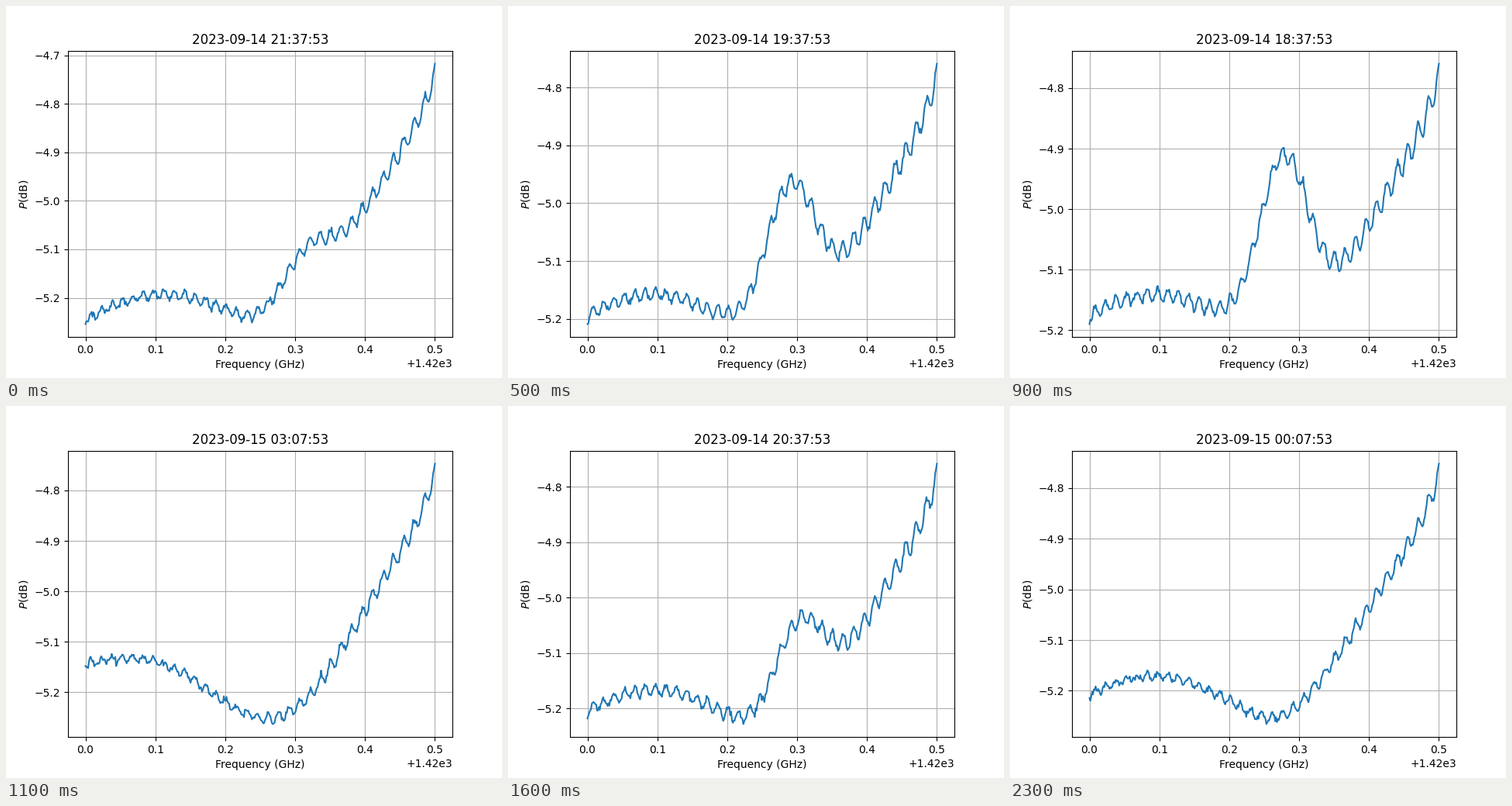
Recreate the animation shown at these times as a matplotlib script. Size 640 by 480 pixels, loop 2400 ms.

```python
import numpy as np
import matplotlib.pyplot as plt
from matplotlib.animation import FuncAnimation

STEP_MS = 100
X = np.linspace(0, 0.5, 400)

# Quiet receiver response in dB, one point per 0.05
BAND = [-5.128, -5.116, -5.124, -5.159, -5.211, -5.246,
        -5.225, -5.148, -5.024, -4.909, -4.747]
RESPONSE = np.polyval(np.polyfit(np.linspace(0, 1, len(BAND)), BAND, 7), 2 * X)

# Extremes of the sweeps through the night; slots count half hours from 20:37
SLOTS = [-5, 0, 1, 2, 6, 7, 11, 13]
LOWS = [-5.180, -5.2282, -5.2365, -5.2541, -5.2563, -5.2657, -5.2583, -5.2630]
HIGHS = [-4.760, -4.7583, -4.7632, -4.7174, -4.7510, -4.7517, -4.7549, -4.7469]

# Sweeps play unsorted; the first one holds for two steps
ORDER = [2, 2, 9, 1, 14, -2, 4, 11, 16, -4, 5, 13,
         -1, 8, 17, -5, 0, 10, 3, 6, 12, -3, 15, 7]


def fade(slot, middle, width):
    return 1 / (1 + np.exp((slot - middle) / width))


def spectrum(slot):
    lo = np.interp(slot, SLOTS, LOWS)
    hi = np.interp(slot, SLOTS, HIGHS)
    early = fade(slot, 0, 2.2)

    # The emission line drifts up in frequency and dies away
    centre = 0.302 + 0.006 * slot
    bump = 0.4 * early * np.exp(-((X - centre) / 0.036) ** 2 / 2)
    sag = 0.08 * fade(slot, 9, 1) * np.clip(1 - X / 0.2, 0, 1)
    tilt = (hi + 4.754) * (X / 0.25 - 1)

    # Standing wave, stronger towards the upper edge
    size = 0.0065 + 0.006 * early + 0.012 * (2 * X) ** 2
    ripple = size * np.cos(2 * np.pi * (X - 0.008) / 0.0149)
    jitter = np.random.default_rng(100 + slot).normal(0, 0.003, len(X))

    y = RESPONSE + bump - sag + tilt + ripple + jitter
    return lo + (y - y.min()) * (hi - lo) / np.ptp(y)


def stamp(slot):
    days, minutes = divmod(20 * 60 + 37 + 30 * slot, 24 * 60)
    return f"2023-09-{14 + days} {minutes // 60:02d}:{minutes % 60:02d}:53"


fig, ax = plt.subplots(figsize=(6.4, 4.8), dpi=100)
line, = ax.plot(1420 + X, spectrum(ORDER[0]))
title = ax.set_title(stamp(ORDER[0]))
ax.set_xlabel("Frequency (GHz)")
ax.set_ylabel("$P$(dB)")
ax.grid()


def update(i):
    slot = ORDER[i]
    line.set_ydata(spectrum(slot))
    title.set_text(stamp(slot))
    ax.relim()
    ax.autoscale_view()
    return line, title


anim = FuncAnimation(fig, update, frames=len(ORDER), interval=STEP_MS,
                     repeat=True, repeat_delay=0)
plt.show()
```
